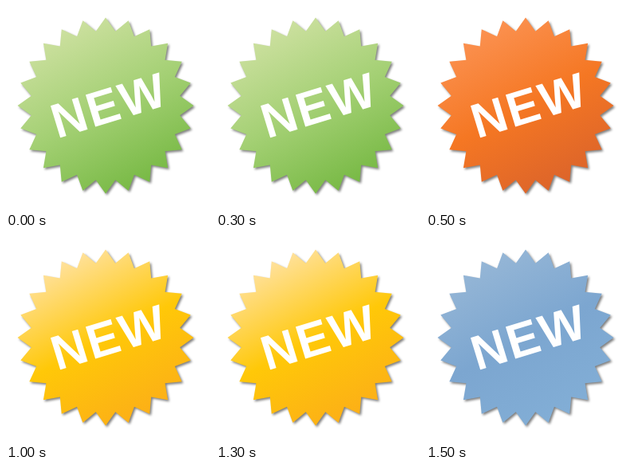
An HTML page for the animation above (2 s loop, 256 by 256 pixels).

```html
<!DOCTYPE html>
<html lang="en">
<head>
<meta charset="utf-8">
<title>New badge</title>
<style>
  html, body { margin: 0; width: 100%; height: 100%; overflow: hidden; background: #fff; }
  svg { display: block; width: 100vw; height: 100vh; }
  text { font: bold 61px "Liberation Sans", Arial, sans-serif; letter-spacing: 2.2px; }
</style>
</head>
<body>
<svg viewBox="0 0 256 256">
  <defs>
    <linearGradient id="paint" gradientUnits="userSpaceOnUse" x1="74" y1="28" x2="176" y2="224">
      <stop offset="0"/>
      <stop offset=".5"/>
      <stop offset="1"/>
    </linearGradient>
    <filter id="blur" x="-10%" y="-10%" width="120%" height="120%">
      <feGaussianBlur stdDeviation="1.7"/>
    </filter>
  </defs>
  <polygon class="burst" transform="translate(1.8 2)" fill="#000" opacity=".5" filter="url(#blur)"/>
  <polygon class="burst" fill="url(#paint)"/>
  <text transform="translate(130 124.3) rotate(-17)" x="-75.3" y="21" fill="#fff">NEW</text>
</svg>
<script>
  const STEP = 500;
  const themes = [
    ["#cce09f", "#a4d074", "#77b944"],
    ["#fb9150", "#f57723", "#dc642a"],
    ["#ffe19c", "#ffc808", "#fcaf17"],
    ["#95b6d6", "#7ca6d0", "#82aed6"]
  ];

  function burst(cx, cy, outer, inner, spikes) {
    return Array.from({ length: spikes * 2 }, (_, i) => {
      const a = i * Math.PI / spikes - Math.PI / 2;
      const r = i % 2 ? inner : outer;
      return `${(cx + r * Math.cos(a)).toFixed(2)},${(cy + r * Math.sin(a)).toFixed(2)}`;
    }).join(" ");
  }

  const shape = burst(125, 125, 110.5, 94, 24);
  document.querySelectorAll(".burst").forEach(p => p.setAttribute("points", shape));

  const stops = document.querySelectorAll("stop");
  const start = performance.now();
  let shown = -1;

  function draw(now) {
    const i = Math.floor(Math.max(0, now - start) / STEP) % themes.length;
    if (i !== shown) {
      stops.forEach((s, k) => s.setAttribute("stop-color", themes[i][k]));
      shown = i;
    }
    requestAnimationFrame(draw);
  }
  draw(start);
</script>
</body>
</html>
```
